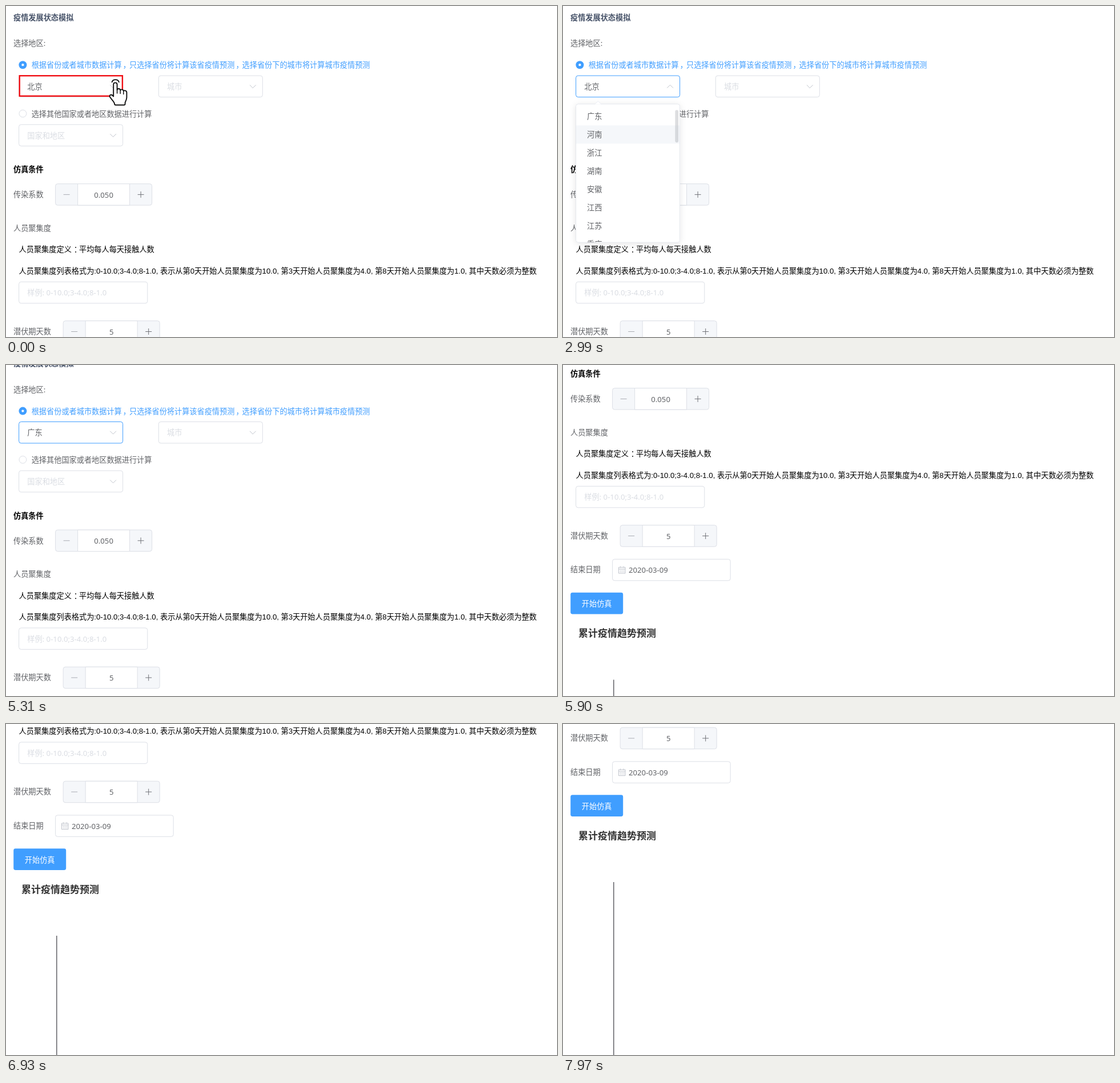
These frames come from a looping animation (965 px wide and 580 px high, 8000 ms). An HTML page:

```html
<!DOCTYPE html>
<html lang="zh-CN">
<head>
<meta charset="utf-8">
<style>
  html, body { margin: 0; width: 100%; height: 100%; overflow: hidden; background: #fff; }
  svg { display: block; width: 100vw; height: 100vh; }
  text { font: 13.18px "Noto Sans", "Noto Sans CJK SC", sans-serif; fill: #606266; white-space: pre; }
  .bold { font-weight: 700; }
  .value { font-weight: 500; }
  .plain { font-family: "Liberation Sans", "Noto Sans CJK SC", sans-serif; fill: #000; }
  .hint { fill: #dadde3; }
  .blue { fill: #409eff; }
  .mid { text-anchor: middle; }
  .box { fill: #fff; stroke: #dcdfe6; }
  .line { fill: none; stroke: #c0c4cc; }
</style>
</head>
<body>
<svg id="stage" viewBox="0 0 965 580"></svg>
<script>
const LOOP = 8000, TICK = 130;
const ROW = 31.96, LIST_H = 242.4, LIST_SCROLL = 308;
const REGIONS = ('湖北 广东 河南 浙江 湖南 安徽 江西 江苏 重庆 山东 四川 黑龙江 北京 上海 ' +
  '河北 福建 广西 陕西 云南 海南 贵州 山西 辽宁 天津').split(' ');
const BEIJING = 12, GUANGDONG = 1;
// Page offset from each moment on
const FIRST_SCROLL = [[5060, 3], [5190, 10], [5310, 22.6], [5440, 58], [5570, 94], [5770, 190], [5900, 271]];

const clamp = (v, lo, hi) => Math.min(hi, Math.max(lo, v));
const ticks = (t, start, max) => clamp(Math.floor((t - start) / TICK) + 1, 0, max);
const phase = n => clamp((n * TICK - 115) / 300, 0, 1);
const reveal = n => 1 - (1 - phase(n)) ** 5;
const smooth = x => x * x * (3 - 2 * x);

const text = (x, cy, s, cls = '', extra = '') =>
  `<text x="${x}" y="${cy + 4.9}" class="${cls}" ${extra}>${s}</text>`;
const box = (x, y, w, h = 37.5, extra = '') =>
  `<rect x="${x}" y="${y}" width="${w}" height="${h}" rx="3.8" class="box" ${extra}/>`;
const chevron = (x, y, id = '') =>
  `<path id="${id}" d="M-5.3-2.6L0 2.7 5.3-2.6" class="line" transform="translate(${x} ${y})"/>`;
const shift = (ch, d) => `<tspan dx="${d}">${ch}</tspan><tspan dx="${-d}">&#8203;</tspan>`;

function select(x, y, label, cls, id = '') {
  return box(x, y, 182, 37.5, `id="${id}Box"`) + text(x + 14.7, y + 19.1, label, cls, `id="${id}Text"`) +
    chevron(x + 165, y + 18.9, id + 'Arrow');
}

function stepper(x, y, value) {
  const cy = y + 18.8;
  return box(x, y, 169, 37.5, 'style="fill:#f5f7fa"') +
    `<path d="M${x + 39} ${y}h91v37.5h-91z" class="box"/>
     <path d="M${x + 14} ${cy}h11" class="line" style="stroke:#a9acb3"/>
     <path d="M${x + 144} ${cy}h11m-5.5-5.5v11" class="line" style="stroke:#707278"/>` +
    text(x + 84.5, cy + .2, value, 'mid value');
}

const calendar = `<path d="M97.5 625.5h11.5v10.5h-11.5zM97.5 628.5h11.5M100.5 623.8v2.5M106 623.8v2.5
  M99.5 631h2m1 0h2m1 0h2M99.5 633.6h2m1 0h2m1 0h2" class="line"/>`;

const hand = `<g id="click">
  <rect x="23.7" y="122.2" width="180.2" height="35.6" fill="none" stroke="#f00f14" stroke-width="2.4"/>
  <g stroke="#111" fill="none" stroke-width="1.9" stroke-linejoin="round" stroke-linecap="round">
    <path d="M185.6 133.4a6.2 5.2 0 0 1 12.2 0"/>
    <path d="M188.2 156.5V137.5c0-4.2 6.4-4.2 6.4 0V147c.5-2.8 5.4-2.6 5.6.6.8-2 5.4-1.6 5.6 1.4
      1-1.6 5.6-1 5.6 2.6V160c0 4.6-2 6.4-2.8 9.2V171.5q0 2-2 2H192q-2 0-2-2.4c-.6-3.4-5-7-7.6-11
      c-2.8-4.4 2.2-6.6 5.8-1.6z" fill="#fff"/>
    <path d="M194.6 147v6M200.2 148v5.5M205.8 149.5v5" stroke-width="1.5"/>
  </g></g>`;

const page = [
  text(13, 20, '疫情发展状态模拟', 'bold', 'style="fill:#475369"'),
  text(13, 65.5, '选择地区:'),
  '<circle cx="29.4" cy="103.2" r="7" class="blue"/><circle cx="29.4" cy="103.2" r="2.1" fill="#fff"/>',
  text(44.7, 103.3, `根据省份或者城市数据计算${shift('，', 2)}只选择省份将计算该省疫情预测${shift('，', 2)}选择省份下的城市将计算城市疫情预测`, 'blue'),
  select(22.6, 122.1, '北京', '', 'region'),
  select(267.3, 122.1, '城市', 'hint'),
  '<circle cx="29.4" cy="188.5" r="6.4" class="box"/>',
  text(44.7, 188.7, '选择其他国家或者地区数据进行计算'),
  select(22.6, 207.8, '国家和地区', 'hint'),
  text(13, 286.4, '仿真条件', 'bold plain'),
  text(13, 330.3, '传染系数'),
  stepper(86.6, 311.6, '0.050'),
  text(13, 388.8, '人员聚集度'),
  text(22.6, 426.5, `人员聚集度定义${shift('：', 4)}平均每人每天接触人数`, 'plain'),
  text(22.6, 464, '人员聚集度列表格式为:0-10.0;3-4.0;8-1.0, 表示从第0天开始人员聚集度为10.0, 第3天开始人员聚集度为4.0, 第8天开始人员聚集度为1.0, 其中天数必须为整数', 'plain'),
  box(22.6, 483.4, 225.2),
  text(37.3, 502.3, '样例: 0-10.0;3-4.0;8-1.0', 'hint'),
  text(13, 570, '潜伏期天数'),
  stepper(100.2, 551.7, '5'),
  text(13, 629.3, '结束日期'),
  box(86.6, 611.3, 206.6),
  calendar,
  text(115, 630.3, '2020-03-09', 'value'),
  '<rect x="13.2" y="669.8" width="92" height="37.7" rx="3.4" class="blue"/>',
  text(59.2, 689.3, '开始仿真', 'mid', 'style="fill:#fff"'),
  text(27, 742.3, '累计疫情趋势预测', 'bold', 'style="font-size:17px;fill:#333"'),
  '<path d="M88.8 822.5V1300" stroke="#4a4b50" stroke-width="1.3"/>'
].join('');

const menu = `<g id="menu">
  <rect x="22.6" width="182" height="${LIST_H}" rx="3.8" fill="#fff" stroke="#e4e7ed" filter="url(#shade)"/>
  <path d="M55.8.4l5.6-5.6 5.6 5.6" fill="#fff" stroke="#ebeef5"/>
  <g clip-path="url(#listClip)">
    <g id="list">
      <rect id="hover" x="23" width="181.2" height="${ROW}" fill="#f5f7fa"/>
      ${REGIONS.map((name, i) => text(42, 21.5 + i * ROW, name)).join('')}
    </g>
    <rect id="thumb" x="196.4" width="5.7" height="57" rx="2.8" fill="#909399"/>
  </g></g>`;

const stage = document.getElementById('stage');
stage.innerHTML = `<defs>
  <clipPath id="listClip"><rect x="22.6" y=".5" width="182" height="${LIST_H - 1}"/></clipPath>
  <filter id="shade" x="-20%" y="-20%" width="140%" height="140%">
    <feDropShadow dx="0" dy="1.9" stdDeviation="5.2" flood-color="#000" flood-opacity=".1"/>
  </filter></defs>
  <g id="page">${page}${menu}${hand}</g>`;

const $ = id => document.getElementById(id);
const set = (id, attr, value) => $(id).setAttribute(attr, value);
const items = [...$('list').querySelectorAll('text')];

function pageOffset(t) {
  if (t < 6150) return FIRST_SCROLL.reduce((y, [at, v]) => t >= at ? v : y, 0);
  const n = ticks(t, 6150, 15);
  return Math.min(545.5, 271 + 32.23 * n - .9204 * n * n);
}

function draw(t) {
  const opening = ticks(t, 1170, 4), closing = ticks(t, 4390, 5);
  const open = reveal(opening) - reveal(closing);
  const turn = 180 * (smooth(phase(opening)) - smooth(phase(closing)));
  const wheel = smooth(ticks(t, 2600, 5) / 5);
  const scroll = LIST_SCROLL * (1 - wheel);
  const pointer = 128 - 74 * wheel;
  const hovered = Math.floor((pointer + scroll - 5.6) / ROW);
  const selected = closing ? GUANGDONG : BEIJING;

  set('page', 'transform', `translate(0 ${-pageOffset(t)})`);
  set('click', 'visibility', opening ? 'hidden' : 'visible');
  $('regionBox').style.stroke = opening ? '#409eff' : '';
  $('regionText').textContent = REGIONS[selected];
  set('regionArrow', 'transform', `translate(187.6 141) rotate(${turn})`);

  set('menu', 'visibility', open > .005 ? 'visible' : 'hidden');
  set('menu', 'opacity', open);
  set('menu', 'transform', `translate(0 171.8) scale(1 ${open})`);
  set('list', 'transform', `translate(0 ${-scroll})`);
  set('hover', 'y', 5.6 + hovered * ROW);
  set('thumb', 'y', 2.7 + scroll * .2386);
  set('thumb', 'opacity', t < 1950 ? .25 : .3);
  items.forEach((el, i) => el.setAttribute('class', i === selected ? 'bold blue' : ''));
}

const start = performance.now();
function frame() {
  draw((performance.now() - start) % LOOP);
  requestAnimationFrame(frame);
}
frame();
</script>
</body>
</html>
```
